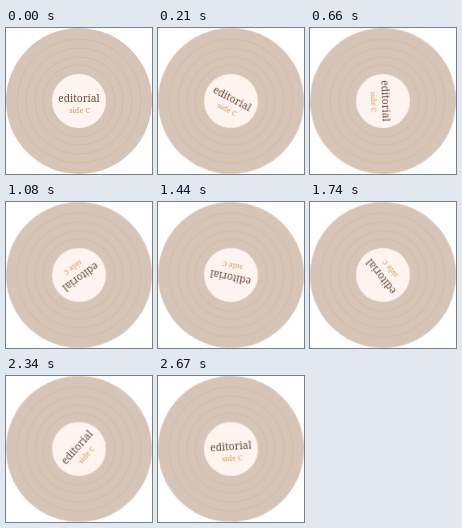
An HTML page for the animation above (2.7 s loop, 146 by 146 pixels).

```html
<!DOCTYPE html>
<html lang="en">
<head>
<meta charset="utf-8">
<title>Record</title>
<style>
  html, body { margin: 0; width: 100%; height: 100%; overflow: hidden; background: #fff; }
  svg { display: block; width: 146px; height: 146px; }
  #record { transform-origin: 73px 73px; }
  .groove { fill: none; stroke: #cdbbad; stroke-width: 1; }
  text { font-family: "Noto Serif", serif; text-anchor: middle; }
  .title { font-size: 10.2px; fill: #6b4938; }
  .side { font-size: 7.4px; fill: #d39a58; }
</style>
</head>
<body>
<svg viewBox="0 0 146 146">
  <g id="record">
    <circle cx="73" cy="73" r="73" fill="#d6c4b6"/>
    <g id="grooves"></g>
    <circle cx="73" cy="73" r="27" fill="#fff4f0"/>
    <text class="title" x="73" y="74">editorial</text>
    <text class="side" x="73.5" y="85.2">side C</text>
  </g>
</svg>
<script>
  const SVG = "http://www.w3.org/2000/svg";
  const grooves = document.getElementById("grooves");

  for (const r of [36, 44, 53, 62]) {
    const ring = document.createElementNS(SVG, "circle");
    ring.setAttribute("class", "groove");
    ring.setAttribute("cx", 73);
    ring.setAttribute("cy", 73);
    ring.setAttribute("r", r);
    grooves.append(ring);
  }

  // One turn in 90 steps of 4 degrees, 30 ms each
  document.getElementById("record").animate(
    [{ transform: "rotate(0deg)" }, { transform: "rotate(360deg)" }],
    { duration: 2700, iterations: Infinity, easing: "steps(90, end)" }
  );
</script>
</body>
</html>
```
